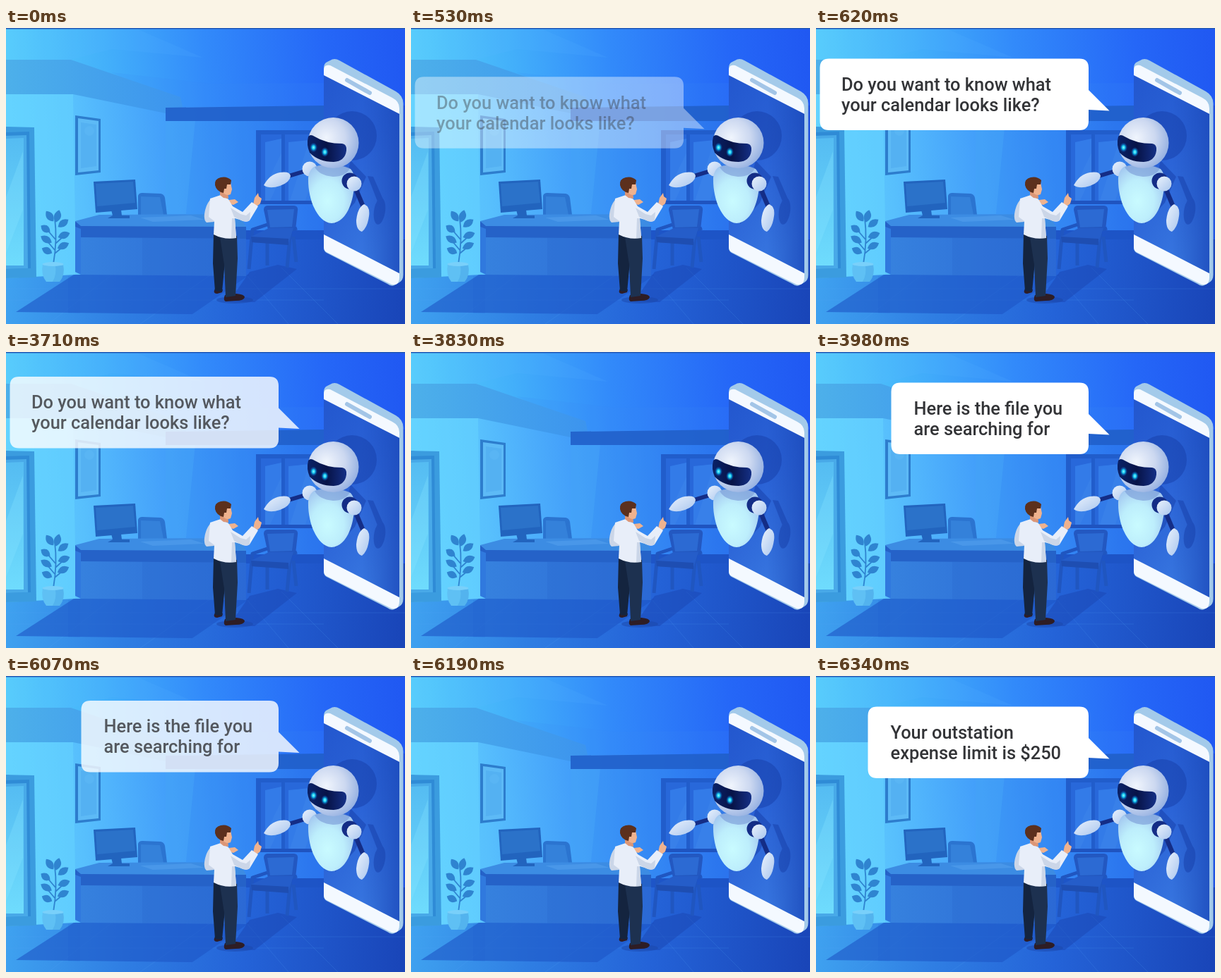
Animation, 565 px wide and 420 px high, one loop 8000 ms. Source, as an HTML page:

```html
<!DOCTYPE html>
<html lang="en">
<head>
<meta charset="utf-8">
<title>Office assistant</title>
<style>
html, body { margin: 0; width: 100%; height: 100%; overflow: hidden; background: #2a74e6; }
svg { display: block; width: 100vw; height: 100vh; }
text { font: 500 25.4px Roboto, Arial, sans-serif; fill: #333437; }
</style>
</head>
<body>
<svg viewBox="0 0 565 420" xmlns="http://www.w3.org/2000/svg">
<defs>
  <linearGradient id="wall" gradientUnits="userSpaceOnUse" x1="0" y1="170" x2="565" y2="120">
    <stop offset="0" stop-color="#61d0fe"/><stop offset=".18" stop-color="#58c0fd"/>
    <stop offset=".4" stop-color="#439ffa"/><stop offset=".62" stop-color="#3382f5"/>
    <stop offset=".82" stop-color="#2767ec"/><stop offset="1" stop-color="#1f50de"/>
  </linearGradient>
  <linearGradient id="ceiling" gradientUnits="userSpaceOnUse" x1="0" y1="60" x2="565" y2="20">
    <stop offset="0" stop-color="#58d0fb"/><stop offset=".25" stop-color="#43b0fa"/>
    <stop offset=".5" stop-color="#328afa"/><stop offset=".8" stop-color="#2567f7"/>
    <stop offset="1" stop-color="#2058f2"/>
  </linearGradient>
  <linearGradient id="floor" gradientUnits="userSpaceOnUse" x1="0" y1="350" x2="565" y2="400">
    <stop offset="0" stop-color="#3fa2f0"/><stop offset=".3" stop-color="#2f7ee3"/>
    <stop offset=".6" stop-color="#2463d8"/><stop offset="1" stop-color="#1945b8"/>
  </linearGradient>
  <linearGradient id="soffit" x1="0" x2="1"><stop stop-color="#4db0ea"/><stop offset="1" stop-color="#3c94ee"/></linearGradient>
  <linearGradient id="glass" x1="0" x2="0" y2="1"><stop stop-color="#55bcf2"/><stop offset="1" stop-color="#6fdcfd"/></linearGradient>
  <linearGradient id="panel" x1="0" x2="1"><stop stop-color="#3681de"/><stop offset="1" stop-color="#2b69d5"/></linearGradient>
  <linearGradient id="screen" x1="0" y1="0" x2=".5" y2="1">
    <stop stop-color="#2357ce"/><stop offset=".5" stop-color="#2a62d6"/><stop offset="1" stop-color="#3877e0"/>
  </linearGradient>
  <linearGradient id="sheen" x1="0" x2="1"><stop offset=".5" stop-color="#1a47b8" stop-opacity="0"/><stop offset="1" stop-color="#1a47b8" stop-opacity=".75"/></linearGradient>
  <radialGradient id="head" cx=".36" cy=".4" r=".75">
    <stop stop-color="#f0f5fd"/><stop offset=".5" stop-color="#ccd8f0"/><stop offset="1" stop-color="#86a6de"/>
  </radialGradient>
  <radialGradient id="torso" cx=".42" cy=".62" r=".65">
    <stop stop-color="#c9fbff"/><stop offset=".55" stop-color="#bdeefc"/><stop offset="1" stop-color="#a3c8f0"/>
  </radialGradient>
  <radialGradient id="eye">
    <stop stop-color="#8cfaff"/><stop offset=".4" stop-color="#12c3ec"/><stop offset=".6" stop-color="#0c86d0" stop-opacity=".7"/><stop offset="1" stop-color="#0c56c0" stop-opacity="0"/>
  </radialGradient>
  <linearGradient id="limb" x1="0" x2="1" y2="1"><stop stop-color="#eaf2fd"/><stop offset="1" stop-color="#a9c6ee"/></linearGradient>
  <linearGradient id="visor" x1="0" x2="1"><stop stop-color="#0a2268"/><stop offset=".5" stop-color="#071347"/><stop offset="1" stop-color="#153086"/></linearGradient>
</defs>

<!-- Room -->
<path fill="url(#wall)" d="M0 0H565V420H0Z"/>
<path fill="url(#ceiling)" d="M0 0H565V110L248 112 92 45H0Z"/>
<path fill="#5ab0ff" opacity=".12" d="M0 2H187L279 42 150 30 92 45H0Z"/>
<path fill="#3a86ee" opacity=".14" d="M150 63 290 79 450 78V110L245 113Z"/>
<path fill="url(#soffit)" d="M0 45H92L247 98 250 112 226 121 95 94H0Z"/>
<path fill="#69d8ff" opacity=".42" d="M0 94H95L98 275V355H0Z"/>
<path fill="#2f8cea" opacity=".2" d="M226 132H450V350H226Z"/>
<path fill="#55b5fa" opacity=".23" d="M226 132H268L255 264H226Z"/>
<path fill="#2160ca" opacity=".9" d="M226 113 450 110V132H226Z"/>
<path fill="url(#floor)" d="M0 355 98 350H340V300H565V420H0Z"/>
<path fill="#1c50c2" opacity=".9" d="M340 287H450V300H340Z"/>
<path fill="#2474dc" opacity=".25" d="M88 352H105V405H88Z"/>
<g stroke="#5aaaf2" stroke-width=".7" opacity=".25" fill="none">
  <path d="M0 386H450M190 420 290 350M60 420 150 350M400 420 340 350M470 420 390 340M0 370H565"/>
</g>
<path fill="#1d56c6" opacity=".6" d="M14 403 96 350H345L264 406Z"/>
<path fill="#1a47b4" opacity=".5" d="M316 388 345 346 385 336 412 342 352 389Z"/>

<!-- Door -->
<path fill="#3b9cdf" d="M0 140 40 141 43 354 0 355Z"/>
<path fill="#2f8bd6" d="M0 148 33 147 35 341 0 342Z"/>
<path fill="#48a9e8" d="M0 153 29 152 31 341 0 342Z"/>
<path fill="url(#glass)" d="M0 157 25 156 25 337H0Z"/>
<path fill="#8ce7ff" opacity=".25" d="M0 240 24 175 24 258 0 320Z"/>

<!-- Picture -->
<path fill="#2d7dcd" d="M98 124 134 129V205L98 209Z"/>
<path fill="#5dbaf6" d="M102 128 131 132V202L102 205Z"/>
<path fill="#54b1f2" d="M106 134 128 137V196L106 199Z"/>
<circle cx="118" cy="146" r="7" fill="#5ebaf5" opacity=".5"/>

<!-- Window -->
<path fill="#215dcb" d="M354 145H450V250H354Z"/>
<path fill="#337be8" d="M361 151H390V245H361ZM395 151H450V245H395Z"/>
<path fill="#2868da" d="M361 151H390V157L367 162V245H361ZM395 151H450V157L400 162V245H395Z"/>
<path fill="#4d97ee" opacity=".18" d="M367 225 390 177V210L374 245H367ZM402 245 430 157H450L424 245Z"/>
<path fill="#1f54c0" d="M351 245H450V250H351Z"/>

<!-- Plant -->
<path fill="none" stroke="#2f84d0" stroke-width="1.8" d="M67 335Q73 300 69 270M70 300 58 286M70 306 82 295M69 315 58 302M69 320 81 310"/>
<g id="leaves" fill="#2f84d0"></g>
<path fill="#5fc0f4" d="M52 335H81Q84 350 76 360H57Q49 350 52 335Z"/>
<path fill="#48a6e8" opacity=".5" d="M70 337H81Q84 350 76 360H66Q72 350 70 337Z"/>
<ellipse cx="66.5" cy="335" rx="15" ry="3" fill="#79d0fa"/>

<!-- Desk -->
<path fill="#2b74d0" d="M187 238Q188 234 193 234L219 235Q224 236 225 241L228 265H187Z"/>
<path fill="#3481da" d="M191 239 218 240 223 265H191Z"/>
<path fill="#3c8ce3" d="M98 274 132 265 330 264 340 282H106Z"/>
<path fill="#2562c8" d="M98 274 106 281 340 282V300L107 299 98 282Z"/>
<path fill="url(#panel)" d="M106 297 340 299V352L106 350Z"/>
<path fill="#3079de" d="M98 282 106 285V350L98 346Z"/>
<path fill="#2a68cd" opacity=".3" d="M193 298H294V351H193Z"/>
<path fill="#68b1f4" opacity=".3" d="M190 269 262 266 281 272 208 275Z"/>
<path fill="#2264be" d="M149 258H163L164 266H175V270H144L151 266Z"/>
<path fill="#2264be" d="M124 218 183 215 186 257 127 262Z"/>
<path fill="#2b72c9" d="M127 221 180 218 183 248 129 253Z"/>

<!-- Chair -->
<path fill="#2358c1" d="M365 258Q365 252 371 252H408Q414 253 413 259L410 286H371Z"/>
<path fill="#2c6ad3" d="M370 258 408 257 405 282 374 283Z"/>
<g fill="none" stroke="#2056c0" stroke-width="5" stroke-linejoin="round">
  <path d="M344 342 349 286 370 279M370 337V301M398 340 403 287 412 284M411 332 407 296"/>
</g>
<path fill="#255dc9" d="M347 296 372 284H407L400 305H352Z"/>
<path fill="#1e4eb2" d="M347 296 400 299V308L348 304Z"/>

<!-- Phone -->
<path fill="#a3caea" d="M450 57Q450 50 455 48L462 44.500Q467 43 472 46L552 90Q562.500 96 562.500 107V350Q562.500 358 557 361L550 365Q545 367 540 363L454 319Q450 317 450 311Z"/>
<path fill="#f4f9ff" d="M450 60Q450 51 459 53L547 99Q557 104 557 114V354Q557 366 546 364L454 318Q450 316 450 311Z"/>
<path fill="url(#screen)" d="M450 67 557 122V348L450 293Z"/>
<path fill="url(#sheen)" d="M450 67 557 122V348L450 293Z"/>
<path d="M483 74 515 92" stroke="#a3c5e7" stroke-width="6" stroke-linecap="round"/>

<!-- Robot -->
<g fill="#173fa9" opacity=".5">
  <circle cx="490" cy="153" r="35"/>
  <path d="M488 188 510 211 494 248 466 278Z"/>
  <ellipse cx="529" cy="260" rx="8" ry="19" transform="rotate(8 529 260)"/>
  <path d="M512 210 520 211 534 243 526 246Z"/>
</g>
<path d="M427 202 397 211" stroke="#142d86" stroke-width="6"/>
<path fill="url(#limb)" d="M365 223Q374 207 388 205 402 203 403 210 402 219 388 224 373 229 365 223Z"/>
<circle cx="430" cy="200" r="10.5" fill="url(#limb)"/>
<path fill="url(#torso)" d="M436 197Q462 190 488 200 494 207 493 216C494 245 482 276 461 277 441 276 427 243 428 212Q429 202 436 197Z"/>
<path fill="#7d9fd9" opacity=".65" d="M437 197Q462 188 487 199 481 211 463 211 443 209 437 197Z"/>
<circle cx="487" cy="217" r="11.5" fill="#142d86"/>
<path d="M496 230 507 256" stroke="#142d86" stroke-width="6.5"/>
<circle cx="493" cy="221" r="10.5" fill="url(#limb)"/>
<path fill="url(#limb)" d="M507 250Q516 253 514 267 512 283 504 289 496 287 496 273 498 254 507 250Z"/>
<circle cx="463.5" cy="163" r="36" fill="url(#head)"/>
<path fill="url(#visor)" d="M428 154Q431 150 437 154 453 164 476 164 483 165 482 174 480 189 464 190 443 190 430 177 425 166 428 154Z"/>
<ellipse cx="435.500" cy="169.500" rx="5.500" ry="7" fill="url(#eye)"/>
<ellipse cx="451.500" cy="176" rx="5.500" ry="7" fill="url(#eye)"/>

<!-- Man -->
<ellipse cx="324" cy="386" rx="26" ry="5" fill="#1b46aa" opacity=".5"/>
<path fill="#2e1d25" d="M296 370 307 371 306 375 299 377Q292 377 296 370ZM310 379 326 377Q338 378 338 382 337 387 325 387L311 388Q307 386 310 379Z"/>
<path fill="#14243f" d="M294 290H318L310 332 306 374 296 373 293 334Z"/>
<path fill="#1d3150" d="M302 290 327 295 328 327 325 380 311 382 309 336Z"/>
<path fill="#cbd6e8" d="M291 242Q283 249 281 264 280 273 284 276L295 275Z"/>
<path fill="#efb28e" d="M316 244 324 243 329 247 322 251 315 249ZM350 250 352 241 357 234 358 239 362 242 360 249 354 254Z"/>
<path fill="#e8eef9" d="M289 242 304 237 315 243 321 253 335 261 348 247 357 253 345 273Q340 277 331 272L324 270 326 298Q309 301 294 293L295 274 287 268Z"/>
<path fill="#cbd6e8" d="M318 255 332 264 340 266 346 261 345 273Q340 277 331 272L323 268ZM320 270 324 270 326 298 319 298Z"/>
<path fill="#dc9676" d="M303 231H314L315 242 308 241 303 237Z"/>
<path fill="#efb28e" d="M308 219 318 219 320 229 318 236Q312 239 307 233Z"/>
<path fill="#5c301d" d="M296 223Q295 214 304 212 313 210 319 216L318 222 313 222 312 228 309 228 308 234Q298 232 296 223Z"/>

<path fill="#2459b4" d="M0 0H565V1.500H0Z"/>
<g id="bubble">
  <path id="shape" fill="#fff"/>
  <text id="line1" y="89"></text>
  <text id="line2" y="118"></text>
</g>
</svg>
<script>
const LOOP = 8000, FRAME = 30, STEPS = 5, TRAVEL = 43;
const $ = id => document.getElementById(id);
const bubble = $("bubble"), shape = $("shape");

const messages = [
  { enter: 500, exit: 3710, left: 5.5, x: 36, lines: ["Do you want to know what", "your calendar looks like?"] },
  { enter: 3860, exit: 6070, left: 106.5, x: 138.5, lines: ["Here is the file you", "are searching for"] },
  { enter: 6220, exit: Infinity, left: 73.5, x: 105.5, lines: ["Your outstation", "expense limit is $250"] }
];

// Leaf centre, angle and half length
const leaves = [[62, 267, 55, 9], [73, 267, -75, 9], [81, 277, -35, 9], [56, 285, 35, 8],
  [82, 294, -20, 9], [57, 300, 30, 9], [81, 309, -25, 9], [58, 316, 25, 8]];
$("leaves").innerHTML = leaves.map(([x, y, turn, r]) =>
  `<path transform="translate(${x} ${y}) rotate(${turn})" d="M${-r} 0Q0 -10 ${r} 0Q0 10 ${-r} 0Z"/>`).join("");

function bubblePath(left) {
  return `M${left + 13} 43.5H373Q386 43.5 386 56.5V88L415.5 117.5 386 116V132Q386 145 373 145` +
    `H${left + 13}Q${left} 145 ${left} 132V56.5Q${left} 43.5 ${left + 13} 43.5Z`;
}

const progress = (t, start) =>
  t < start ? 0 : Math.min(1, (Math.floor((t - start) / FRAME) + 1) / STEPS);

let shown = null;
function setMessage(m) {
  if (m === shown) return;
  shown = m;
  shape.setAttribute("d", bubblePath(m.left));
  m.lines.forEach((words, i) => {
    const line = $("line" + (i + 1));
    line.setAttribute("x", m.x);
    line.textContent = words;
  });
}

function draw(t) {
  const m = messages.filter(m => t >= m.enter).pop() || messages[0];
  setMessage(m);
  const come = progress(t, m.enter), go = progress(t, m.exit);
  bubble.setAttribute("transform", `translate(0 ${TRAVEL * (1 - come - go)})`);
  // Panel and words fade separately, so the words pale towards the panel
  for (const part of bubble.children) part.setAttribute("opacity", come * (1 - go));
}

const start = performance.now();
function tick() {
  draw((performance.now() - start) % LOOP);
  requestAnimationFrame(tick);
}
tick();
</script>
</body>
</html>
```
